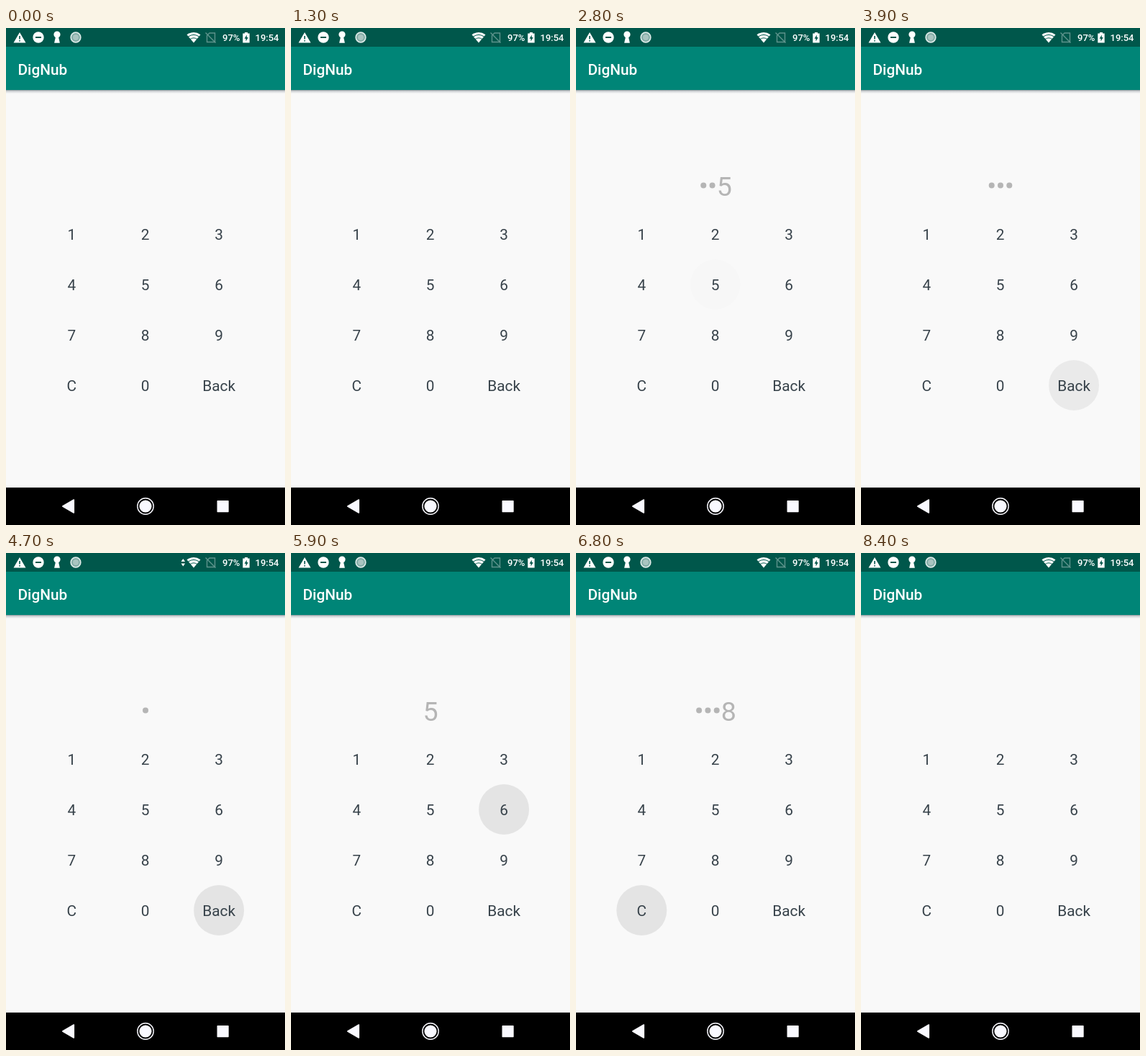
Recreate the animation shown at these times as an HTML page. Size 388 by 690 pixels, loop 8500 ms.

```html
<!DOCTYPE html>
<html lang="en">
<head>
<meta charset="utf-8">
<title>Pin entry</title>
<style>
  html, body { margin: 0; width: 100%; height: 100%; overflow: hidden; background: #f9f9f9; }
  svg { display: block; width: 100vw; height: 100vh; font-family: Roboto, sans-serif; }
</style>
</head>
<body>
<svg viewBox="0 0 388 690">
  <defs>
    <linearGradient id="shade" x2="0" y2="1">
      <stop offset="0" stop-color="#8b9599"/>
      <stop offset=".35" stop-color="#d0d3d6"/>
      <stop offset="1" stop-color="#f9f9f9"/>
    </linearGradient>
  </defs>
  <rect width="388" height="690" fill="#f9f9f9"/>
  <rect y="86" width="388" height="5" fill="url(#shade)"/>
  <rect y="26" width="388" height="60" fill="#008577"/>
  <rect width="388" height="26" fill="#00574b"/>
  <text x="16.5" y="64.5" font-size="20.8" font-weight="500" fill="#fff">DigNub</text>

  <g id="status" fill="#fff">
    <path d="M19 6L27.5 20.5H10.5Z"/>
    <path d="M19 11v4.5M19 17v1.6" stroke="#00574b" stroke-width="1.6"/>
    <circle cx="45" cy="13" r="7.7"/>
    <path d="M41 13h8" stroke="#00574b" stroke-width="2"/>
    <circle cx="71" cy="9" r="4.6"/>
    <path d="M69.3 11h3.4l2.2 9.7h-7.8z"/>
    <circle cx="97" cy="13" r="6.8" fill="#80aaa4" stroke="#dce9e7" stroke-width="1.7"/>
    <circle cx="97" cy="13" r="4" fill="#a9c4c0"/>
    <path d="M261 20.5L251.5 9.3Q261 2.5 270.5 9.3Z"/>
    <path d="M253.2 12.2Q261 6.6 268.8 12.2M256 15.6Q261 12 266 15.6" fill="none" stroke="#00574b" stroke-width="1"/>
    <path id="arrows" d="M246.3 8l2.8 4h-5.6zM246.3 18.5l2.8-4h-5.6z"/>
    <g fill="none" stroke="#5f938c" stroke-width="1.4">
      <path d="M283 7h7.5v12.5h-11V10.5z"/>
      <path d="M277.5 6.5l14 14"/>
    </g>
    <path d="M332 6h4v1.6h2.7v12.9h-9.4V7.6h2.7z"/>
    <path d="M334.8 9.5l-3.2 5.3h2v3.6l3.2-5.4h-2z" fill="#00574b"/>
    <g font-size="13" font-weight="500">
      <text x="301" y="18">97%</text>
      <text x="346.5" y="18">19:54</text>
    </g>
  </g>

  <g id="ripples"></g>
  <g id="keys" font-size="20.8" fill="#37424a" text-anchor="middle"></g>
  <g id="pin" fill="#b5b5b5"></g>

  <rect y="638" width="388" height="52" fill="#000"/>
  <g fill="#f9f9ff" stroke="#f9f9ff" stroke-linejoin="round">
    <path d="M78.8 664L94.3 655V673Z" stroke-width="1.6"/>
    <circle cx="194" cy="664" r="8.6" stroke="none"/>
    <circle cx="194" cy="664" r="11.2" fill="none" stroke-width="1.4"/>
    <rect x="294.2" y="656.7" width="14.8" height="14.8" stroke-width="1.4"/>
  </g>
</svg>
<script>
const LOOP = 8500, TICK = 100, GROW = 100, FADE = 300, REVEAL = 1500;
const labels = ['1', '2', '3', '4', '5', '6', '7', '8', '9', 'C', '0', 'Back'];
// key, finger down, finger up (ms)
const presses = [
  ['1', 1500, 1740], ['2', 2080, 2190], ['5', 2380, 2525], ['6', 2960, 3110],
  ['Back', 3660, 3810], ['Back', 3950, 4090], ['Back', 4240, 4380], ['Back', 4540, 4750],
  ['5', 5120, 5250], ['6', 5720, 5960], ['8', 6050, 6150], ['8', 6280, 6360],
  ['C', 6700, 6880]
];

const $ = id => document.getElementById(id);
function add(parent, tag, attrs) {
  const el = document.createElementNS('http://www.w3.org/2000/svg', tag);
  for (const k in attrs) el.setAttribute(k, attrs[k]);
  return parent.appendChild(el);
}
const clamp = v => Math.max(0, Math.min(1, v));
const keyPos = key => {
  const i = labels.indexOf(key);
  return [91.3 + (i % 3) * 102.4, 286 + Math.floor(i / 3) * 70];
};

for (const key of labels) {
  const [x, y] = keyPos(key);
  add($('keys'), 'text', { x, y: y + 8.2 }).textContent = key;
}
const ripples = presses.map(([key]) => {
  const [cx, cy] = keyPos(key);
  return add($('ripples'), 'circle', { cx, cy, r: 0 });
});
const dots = [0, 1, 2, 3].map(() => add($('pin'), 'circle', { cy: 218.5, r: 4 }));
const digit = add($('pin'), 'text', { y: 232.7, 'font-size': 37.7, 'text-anchor': 'middle' });

function drawPin(t) {
  let pin = '', shownUntil = 0;
  for (const [key, , up] of presses) {
    if (up > t) break;
    if (key === 'C') pin = '';
    else if (key === 'Back') pin = pin.slice(0, -1);
    else pin += key;
    shownUntil = key.length === 1 && key !== 'C' ? up + REVEAL : 0;
  }
  const open = pin && t < shownUntil;
  const hidden = pin.length - (open ? 1 : 0);
  const pitch = 12.3, wide = 21.2;
  const left = 194 - (hidden * pitch + (open ? wide : 0)) / 2;
  dots.forEach((dot, i) => {
    dot.setAttribute('cx', left + (i + 0.5) * pitch);
    dot.setAttribute('opacity', i < hidden ? 1 : 0);
  });
  digit.setAttribute('x', left + hidden * pitch + wide / 2);
  digit.textContent = open ? pin.slice(-1) : '';
}

function draw(t) {
  presses.forEach(([, down, up], i) => {
    const grow = clamp((t - down) / GROW);
    const fade = 1 - clamp((t - up) / FADE);
    ripples[i].setAttribute('r', 20 + 15 * grow);
    ripples[i].setAttribute('opacity', 0.085 * grow * fade);
  });
  drawPin(t);
  $('arrows').setAttribute('opacity', t >= 4400 && t < 5200 ? 1 : 0);
}

const start = performance.now();
function frame() {
  const t = (performance.now() - start) % LOOP;
  draw(Math.floor(t / TICK) * TICK);
  requestAnimationFrame(frame);
}
frame();
</script>
</body>
</html>
```
